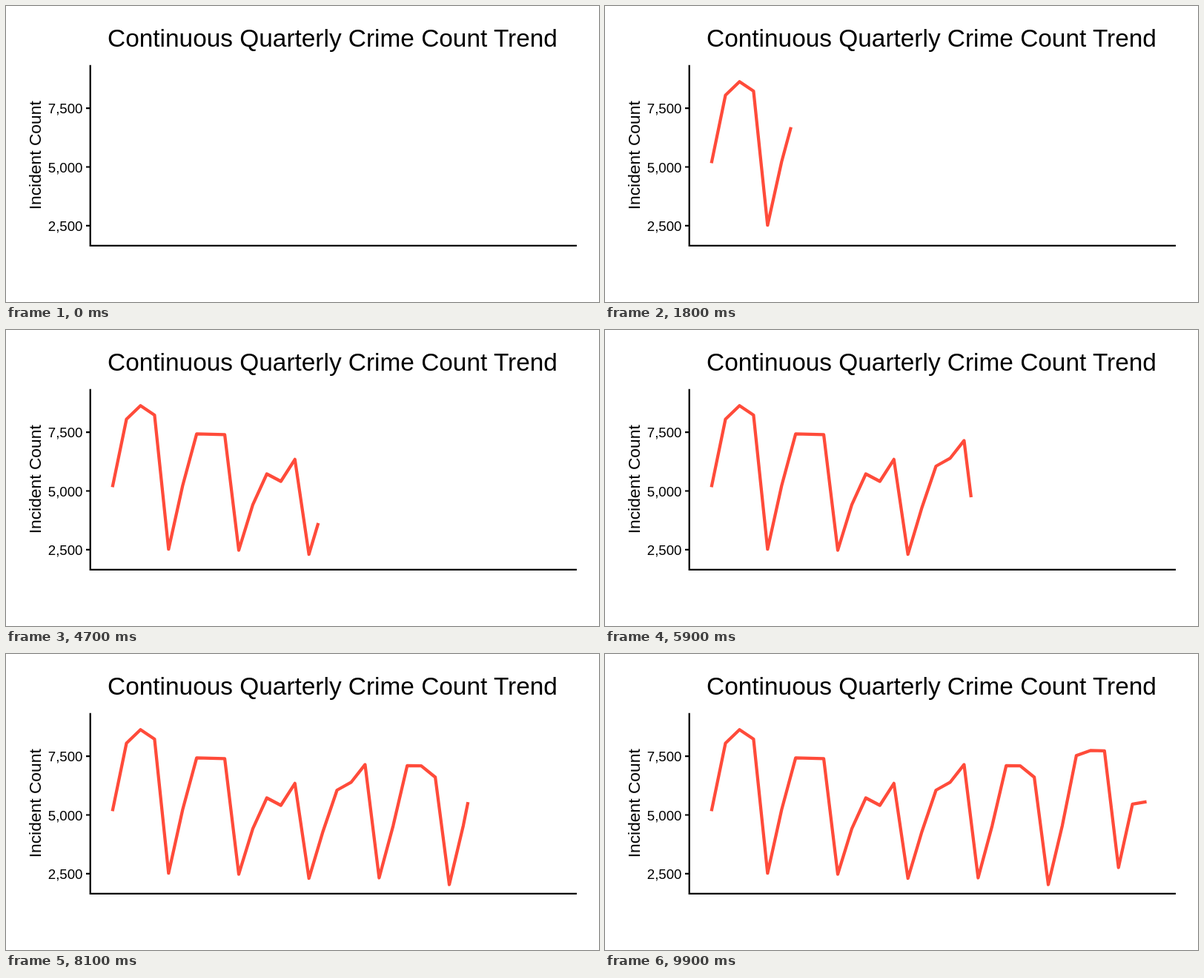
Animation, 800 px wide and 400 px high, one loop 10000 ms. Source, as an HTML page:

```html
<!DOCTYPE html>
<html lang="en">
<head>
<meta charset="utf-8">
<title>Continuous Quarterly Crime Count Trend</title>
<style>
  html, body { margin: 0; width: 100%; height: 100%; overflow: hidden; background: #fff; }
  svg { display: block; width: 800px; height: 400px; }
  text { font-family: "Liberation Sans", Arial, sans-serif; fill: #000; }
  .axis { fill: none; stroke: #000; stroke-width: 2.2; }
  #trend { fill: none; stroke: #ff4b3a; stroke-width: 4.27; stroke-linejoin: round; }
</style>
</head>
<body>
<svg viewBox="0 0 800 400">
  <text x="440.5" y="55.3" font-size="33.4" text-anchor="middle">Continuous Quarterly Crime Count Trend</text>
  <text transform="translate(46.8 201.8) rotate(-90)" font-size="22.8" text-anchor="middle">Incident Count</text>
  <g id="labels" font-size="18.67" text-anchor="end"></g>
  <path id="trend"/>
  <path class="axis" d="M113.7 79.8V323.8H770"/>
  <path class="axis" id="ticks"/>
</svg>
<script>
  const LOOP = 10000, STEP = 100, LAST_STEP = 99;
  const byId = id => document.getElementById(id);
  const mix = (a, b, k) => a + (b - a) * k;

  const ticks = [7500, 5000, 2500].map((count, i) => ({ count, y: 138.2 + 79.3 * i }));
  byId("ticks").setAttribute("d", ticks.map(t => `M108 ${t.y}H113.7`).join(""));
  byId("labels").innerHTML = ticks.map(t =>
    `<text x="103.5" y="${t.y + 7.1}">${t.count.toLocaleString("en-US")}</text>`).join("");

  // Every fifth quarter dips, then the line climbs to a plateau that bends up or down.
  const swing = c => 21 * Math.sin(1.35 * (c - 1)) * Math.exp(-((c - 1.5) ** 2) / 8);

  function cycleHeights([dip, top, end], c) {
    const climb = mix(dip, top, 0.57 - 0.02 * c + swing(c) / 300);
    const middle = mix(top, end, 0.5) + swing(c);
    return [dip, climb, top, middle, end];
  }

  const cycles = [
    [311.4, 120.5, 115], [296.2, 140.4, 141.4], [297.6, 194.5, 174.8],
    [303.2, 184, 149.4], [302.5, 151, 166.5], [311.6, 137.2, 130.8]
  ];
  const lastQuarters = [288.5, 202.8, 199.7];
  // The series begins on the first climb, without its dip.
  const heights = cycles.flatMap(cycleHeights).slice(1).concat(lastQuarters);

  // Each quarter is reached on a whole step; the line is interpolated in between.
  const points = heights.map((y, i) => ({
    x: 143.6 + 18.935 * i,
    y,
    step: Math.round(i * LAST_STEP / (heights.length - 1))
  }));
  const coords = p => p.x.toFixed(2) + " " + p.y.toFixed(2);

  function trendPath(step) {
    if (step === 0) return "";
    const shown = points.filter(p => p.step <= step);
    const from = shown[shown.length - 1], to = points[shown.length];
    if (to && step > from.step) {
      const k = (step - from.step) / (to.step - from.step);
      shown.push({ x: mix(from.x, to.x, k), y: mix(from.y, to.y, k) });
    }
    return "M" + shown.map(coords).join("L");
  }

  const start = performance.now();
  function draw() {
    const time = (performance.now() - start) % LOOP;
    byId("trend").setAttribute("d", trendPath(Math.floor(time / STEP)));
    requestAnimationFrame(draw);
  }
  draw();
</script>
</body>
</html>
```
